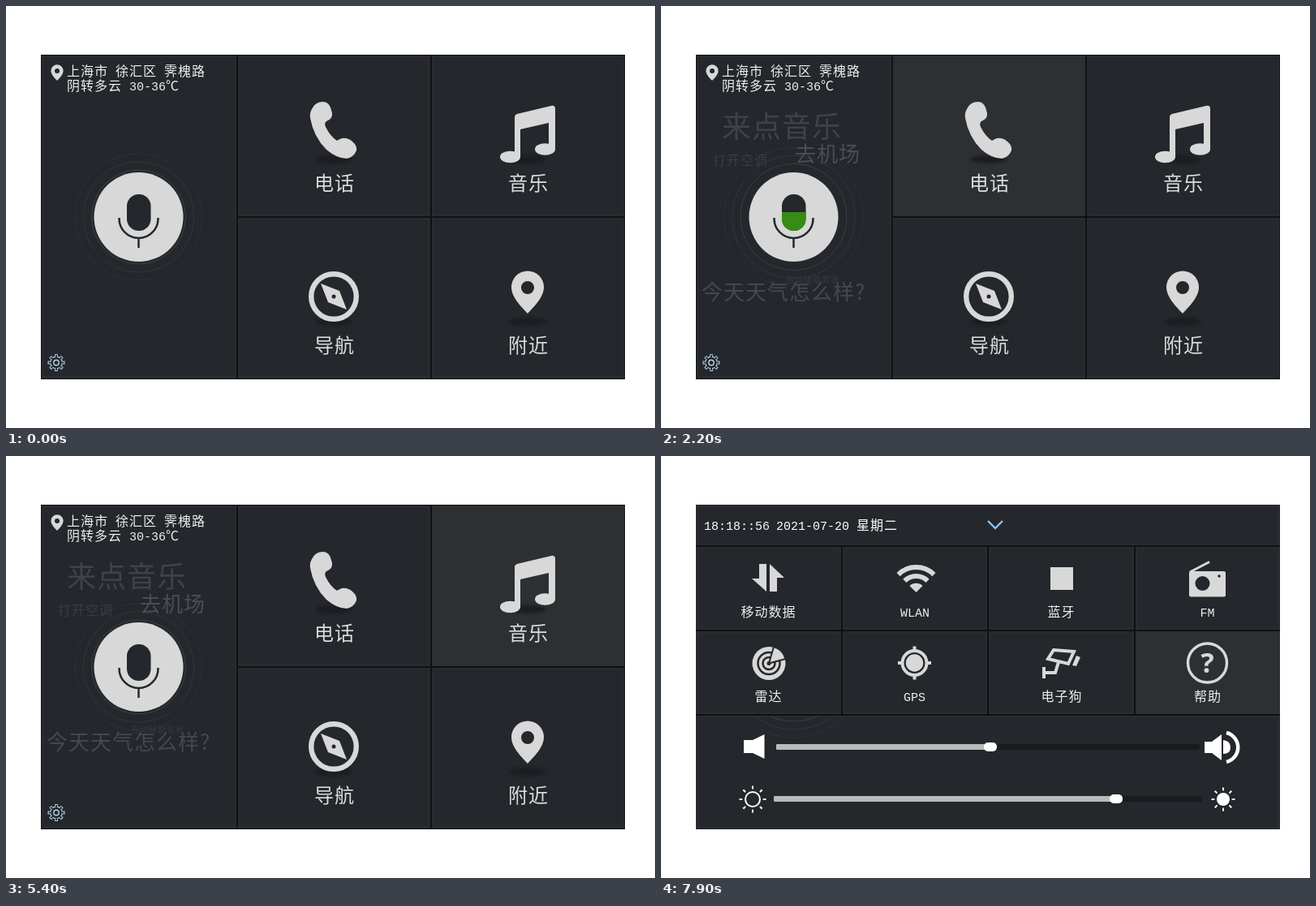
Animation, 800 px wide and 520 px high, one loop 8 s. Source, as an HTML page:

```html
<!DOCTYPE html>
<html lang="zh-CN">
<head>
<meta charset="utf-8">
<title>Car console</title>
<style>
@property --h { syntax: "<number>"; inherits: true; initial-value: 0; }
html, body { margin: 0; width: 100%; height: 100%; overflow: hidden; background: #fff; }
svg { display: block; width: 800px; height: 520px; }
text { font: 16px "Noto Sans CJK SC", "Noto Sans CJK", sans-serif; letter-spacing: 1px; white-space: pre; fill: #eee; }
.mono { font: 15px "Liberation Mono", monospace; letter-spacing: 0; }
.mid { text-anchor: middle; }
.big text { font-size: 24px; fill: #dcdcdc; }
.l { fill: #d8d8d8; }
.d { fill: #24272b; }
.ln { fill: none; stroke: #d8d8d8; }
.dk { fill: none; stroke: #24272b; }
.w { fill: #fff; }
.grid { fill: none; stroke: #0f1113; stroke-width: 2; }
.rim rect { fill: #24272b; stroke: #282b2f; stroke-width: 3; }
.ring { fill: none; stroke-width: 1; }

/* one 8 s clock for every part */
.home, .panel, .hover, .tap, .s4, .s5, .s6, .stale { animation: 8s step-end infinite; }
.home { animation-name: home; }
.panel { animation-name: panel; }
.hover { animation-name: hover; }
.tap { animation-name: tap; }
.s4 { animation-name: s4; }
.s5 { animation-name: s5; }
.s6 { animation-name: s6; }
.stale { animation-name: stale; }
.voice { animation: level 8s linear infinite; }
.hints { animation: hints 8s linear infinite; }
.voice .ring { r: calc((var(--b) + var(--h) / 3) * 1px); }
.fill { transform: translateY(calc(var(--h) * -1px)); }

@keyframes level {
  0%, 22.5%, 45%, 67.5% { --h: 0; }
  5%, 27.5%, 50%, 72.5% { --h: 23; }
  10%, 32.5%, 55%, 77.5% { --h: 28; }
  12.5%, 35%, 57.5%, 100% { --h: 28; }
  18.75%, 41.25%, 63.75% { --h: 12; }
}
@keyframes hints { 0% { opacity: 0; } 6%, 100% { opacity: 1; } }
@keyframes home { 0% { opacity: 1; } 76.2% { opacity: 0; } }
@keyframes panel { 0% { opacity: 0; } 76.2% { opacity: 1; } }
@keyframes hover {
  0% { opacity: 0; }
  17.5% { opacity: 1; transform: none; }
  48.7% { opacity: 1; transform: translate(239px, 0); }
  70% { opacity: 0; }
}
@keyframes tap {
  0% { opacity: 0; }
  82.4% { opacity: 1; transform: none; }
  87.4% { opacity: 1; transform: translate(0, 104px); }
  89.9% { opacity: 1; transform: translate(180px, 104px); }
  92.4% { opacity: 1; transform: translate(180px, 0); }
  94.3% { opacity: 1; transform: translate(361px, 0); }
  96.2% { opacity: 1; transform: translate(541px, 0); }
  98.7% { opacity: 1; transform: translate(541px, 104px); }
}
@keyframes s4 { 0% { opacity: 1; } 79.9% { opacity: 0; } }
@keyframes s5 { 0% { opacity: 0; } 79.9% { opacity: 1; } 92.4% { opacity: 0; } }
@keyframes s6 { 0% { opacity: 0; } 92.4% { opacity: 1; } }
@keyframes stale { 0% { opacity: 1; } 87.4% { opacity: 0; } }
</style>
</head>
<body>
<svg viewBox="0 0 800 520">
<defs>
  <path id="pin" fill-rule="evenodd" d="M643 379C638 373 623 360 623 346.500A20 20 0 0 1 663 346.500C663 360 648 373 643 379ZM635 347a8 8 0 1 0 16 0a8 8 0 1 0 -16 0Z"/>
  <clipPath id="cup"><rect x="149" y="232" width="29.500" height="45" rx="14.500"/></clipPath>
  <clipPath id="sides"><path d="M75 218h40v100h-40zM226 218h30v100h-30z"/></clipPath>
  <clipPath id="below"><path d="M105 320h120v30h-120z"/></clipPath>
  <g id="echo" class="ring">
    <circle cx="163.500" cy="260" r="87" stroke="#2e3337"/>
    <circle cx="163.500" cy="260" r="77" stroke="#33393d"/>
    <circle cx="163.500" cy="260" r="67" stroke="#3c4246"/>
  </g>
  <filter id="soft" x="-30%" y="-60%" width="160%" height="220%"><feGaussianBlur stdDeviation="1.500"/></filter>
</defs>

<rect class="d" x="43" y="60" width="720" height="400"/>

<g class="home">
  <g class="rim">
    <rect x="45" y="62" width="238" height="396"/>
    <rect x="287" y="62" width="235" height="196"/>
    <rect x="526" y="62" width="235" height="196"/>
    <rect x="287" y="262" width="235" height="196"/>
    <rect x="526" y="262" width="235" height="196"/>
  </g>
  <rect class="hover" x="286" y="61" width="238" height="198" fill="#2c3033"/>
  <path class="grid" d="M285 60V460M524 60V460M285 260H763"/>
  <rect x="43.500" y="60.500" width="719" height="399" fill="none" stroke="#0f1113"/>

  <use href="#pin" class="l" transform="translate(-181.300 -51.900) scale(.38)"/>
  <text x="75" y="86">上海市<tspan class="mono"> </tspan>徐汇区<tspan class="mono"> </tspan>霁槐路</text>
  <text x="75" y="104">阴转多云<tspan class="mono"> 30-36</tspan>℃</text>

  <g class="voice">
    <circle class="ring" cx="163.500" cy="260" stroke="#2d3236" style="--b:78"/>
    <circle class="ring" cx="163.500" cy="260" stroke="#31373b" style="--b:68"/>
    <circle class="ring" cx="163.500" cy="260" stroke="#3b4145" style="--b:58"/>
    <g class="hints">
      <text x="75" y="162" style="font-size:36px;fill:#3f4347">来点音乐</text>
      <text x="165" y="192" style="font-size:26px;fill:#4a4e55">去机场</text>
      <text x="64" y="196" style="fill:#393d41">打开空调</text>
      <text x="50" y="362" style="font-size:26px;fill:#45494d">今天天气怎么样?</text>
      <text x="154" y="341" style="font-size:10px;fill:#363a3e">自动辅助驾驶</text>
    </g>
    <circle class="l" cx="163.500" cy="260" r="55"/>
    <g clip-path="url(#cup)">
      <rect class="d" x="149" y="232" width="30" height="45"/>
      <rect class="fill" x="149" y="277" width="30" height="46" fill="#378c16"/>
    </g>
    <path class="dk" stroke-width="2.500" d="M139.500 261V262A24 24 0 0 0 187.500 262V261M163.500 286V298"/>
  </g>

  <g fill="#1b1d20" filter="url(#soft)">
    <ellipse cx="404" cy="189" rx="22" ry="5"/>
    <ellipse cx="643" cy="189" rx="22" ry="5"/>
    <ellipse cx="404" cy="389" rx="22" ry="5"/>
    <ellipse cx="643" cy="389" rx="22" ry="5"/>
  </g>
  <path class="l" d="M377 127Q381 118 391 118Q397 118 400 125L402 132Q403 139 395 142Q392 144 394 149Q400 161 408 166Q411 164 414 163Q421 162 427 167Q433 172 432 178Q429 186 420 188Q408 188 395 177Q379 161 375 138Q374 132 377 127Z"/>
  <g class="l">
    <path d="M627 187V137Q627 134 630 133L672 123Q677 122 677 127V177H669V144L634 152V187Z"/>
    <ellipse cx="621.500" cy="186" rx="12.500" ry="7.300"/>
    <ellipse cx="664.500" cy="176.500" rx="12.500" ry="7.300"/>
  </g>
  <circle class="ln" cx="404" cy="358" r="27.800" stroke-width="6.400"/>
  <path class="l" d="M388 342L411 351L420 374L397 365Z"/>
  <circle class="d" cx="404" cy="358" r="2.500"/>
  <use href="#pin" class="l"/>
  <g class="big mid">
    <text x="405" y="227">电话</text>
    <text x="644" y="227">音乐</text>
    <text x="405" y="427">导航</text>
    <text x="644" y="427">附近</text>
  </g>

  <g transform="translate(62 439.500)" stroke="#b4d2ec" fill="none">
    <circle r="8.500" stroke-width="4" pathLength="360" stroke-dasharray="24 21" stroke-dashoffset="12"/>
    <circle r="7.900" fill="#b4d2ec" stroke="none"/>
    <circle r="7.900" stroke="#24272b" stroke-width="3" pathLength="360" stroke-dasharray="14 31" stroke-dashoffset="7"/>
    <circle r="6.700" class="d" stroke="none"/>
    <circle r="3.200" stroke-width="1.400"/>
  </g>
</g>

<g class="panel">
  <rect class="d" x="43" y="60" width="720" height="400"/>
  <g class="rim">
    <rect x="45" y="62" width="716" height="47"/>
    <rect x="45" y="113" width="176" height="100"/>
    <rect x="225" y="113" width="176" height="100"/>
    <rect x="405" y="113" width="177" height="100"/>
    <rect x="586" y="113" width="175" height="100"/>
    <rect x="45" y="217" width="176" height="100"/>
    <rect x="225" y="217" width="176" height="100"/>
    <rect x="405" y="217" width="177" height="100"/>
    <rect x="586" y="217" width="175" height="100"/>
    <rect x="45" y="321" width="716" height="137"/>
  </g>
  <rect class="tap" x="43" y="112" width="179" height="102" fill="#2c3033"/>
  <path class="grid" d="M43 111H763M43 215H763M43 319H763M223 111V319M403 111V319M584 111V319"/>
  <use href="#echo" clip-path="url(#below)"/>
  <use href="#echo" class="stale" clip-path="url(#sides)"/>

  <text class="mono" x="53" y="91" style="fill:#fff">18:18::5</text>
  <g class="s4"><text class="mono" x="125" y="91">4</text></g>
  <g class="s5"><text class="mono" x="125" y="91">5</text></g>
  <g class="s6"><text class="mono" x="125" y="91">6</text></g>
  <text x="142" y="91" style="fill:#fff"><tspan class="mono">2021-07-20 </tspan>星期二</text>
  <path d="M403 80L412 89L421 80" fill="none" stroke="#8fc1f5" stroke-width="2.400"/>

  <path class="l" d="M121 133h9v34L112 151h9zM134 133L152 150h-9v17h-9z"/>

  <path class="ln" stroke-width="6" d="M292.600 146.100a31 31 0 0 1 43.800 0M300.400 153.900a20 20 0 0 1 28.200 0"/>
  <path class="l" d="M314.500 168l-8 -8a11.300 11.300 0 0 1 16 0z"/>

  <rect class="l" x="480" y="137" width="28" height="28"/>

  <path class="ln" stroke-width="3" d="M652 143L676 130.500"/>
  <rect class="l" x="651" y="142" width="45" height="31.500" rx="2"/>
  <circle class="d" cx="667.500" cy="157" r="9"/>
  <circle class="d" cx="688" cy="148" r="1.800"/>

  <circle class="l" cx="133" cy="255.500" r="20.500"/>
  <circle class="dk" cx="133" cy="255.500" r="13.500" stroke-width="2.500"/>
  <circle class="dk" cx="133" cy="255.500" r="7.500" stroke-width="2.500"/>
  <path d="M133 255.500L139 235A21 21 0 0 1 153.500 250Z" fill="#d8d8d8" stroke="#24272b" stroke-width="2"/>
  <circle class="d" cx="133" cy="255.500" r="2.500"/>

  <g transform="translate(312.500 255)">
    <circle class="ln" r="15" stroke-width="4"/>
    <circle class="l" r="10.700"/>
    <path class="ln" stroke-width="4" d="M-20.500 0h6M14.500 0h6M0 -20.500v6M0 14.500v6"/>
  </g>

  <path class="ln" stroke-width="4" d="M484 239L509 241L502 256L477 250ZM472 260V274M472 267H486L490 254"/>
  <path class="l" d="M512 246L517 248L512 259L507 258Z"/>

  <circle class="ln" cx="673.500" cy="255" r="24" stroke-width="3.400"/>
  <text class="mid" x="673.500" y="267" style="font:bold 34px 'Open Sans',sans-serif;letter-spacing:0;fill:#d8d8d8">?</text>

  <g class="mid">
    <text x="132.500" y="198">移动数据</text>
    <text class="mono" x="313" y="198">WLAN</text>
    <text x="493.500" y="198">蓝牙</text>
    <text class="mono" x="673.500" y="198">FM</text>
    <text x="132.500" y="302">雷达</text>
    <text class="mono" x="312.500" y="302">GPS</text>
    <text x="494" y="302">电子狗</text>
    <text x="674" y="302">帮助</text>
  </g>
  <path class="stale" d="M150 251H178V266Q176 274 170 274H156Q151 273 150 265Z" fill="#378c16"/>

  <path class="w" d="M102 350H113L127.500 343V373L113 366H102ZM670 352H679L691 343V375L679 366H670Z"/>
  <path class="w" d="M693 350Q702 351 702 359T693 367Z"/>
  <path d="M697 341A18.500 18.500 0 0 1 697 377" fill="none" stroke="#fff" stroke-width="4.500"/>
  <rect x="142" y="355" width="522" height="7" rx="2" fill="#191b1e"/>
  <rect x="142" y="355" width="262" height="7" rx="1" fill="#bababa"/>
  <rect class="w" x="398" y="353" width="16" height="11" rx="5"/>

  <g transform="translate(113 423)" fill="none" stroke="#fff">
    <circle r="9" stroke-width="2"/>
    <circle r="14.500" stroke-width="4" pathLength="360" stroke-dasharray="8 37" stroke-dashoffset="4"/>
  </g>
  <g transform="translate(693 423)">
    <circle class="w" r="8"/>
    <circle r="12.500" fill="none" stroke="#fff" stroke-width="4" pathLength="360" stroke-dasharray="9 36" stroke-dashoffset="4.500"/>
  </g>
  <rect x="139" y="419" width="528" height="7" rx="2" fill="#191b1e"/>
  <rect x="139" y="419" width="420" height="7" rx="1" fill="#bababa"/>
  <rect class="w" x="553" y="417" width="16" height="11" rx="5"/>
</g>
</svg>
</body>
</html>
```
